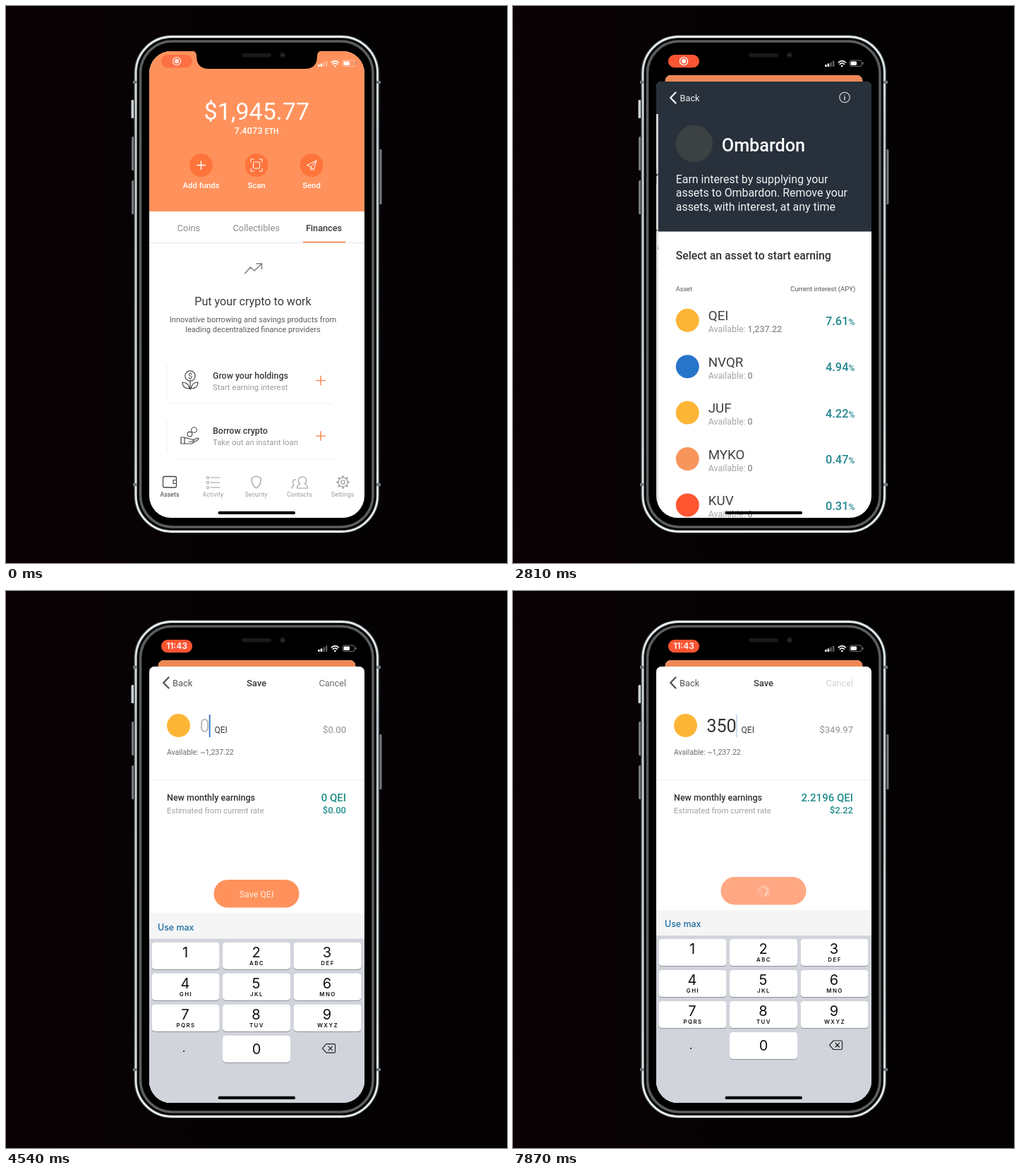
Recreate the animation shown at these times as an HTML page. Size 710 px wide and 789 px high, loop 8 s.

```html
<!DOCTYPE html>
<html lang="en">
<head>
<meta charset="utf-8">
<title>Wallet savings flow</title>
<style>
  html, body { margin: 0; width: 100%; height: 100%; overflow: hidden; background: #060203; }
  svg { display: block; width: 100%; height: 100%; font-family: Roboto, Arial, sans-serif; }
  .line { fill: none; stroke-linecap: round; stroke-linejoin: round; }
  .keys { font-family: Inter, Arial, sans-serif; }
</style>
</head>
<body>
<svg id="stage" viewBox="0 0 710 789" xmlns="http://www.w3.org/2000/svg"></svg>
<script>
const LOOP = 8000;
const ORANGE = '#ff925c', TEAL = '#1f8d8a', NAVY = '#28303b', GOLD = '#fdb536';
const COIN = 'QEI', LENDER = 'Ombardon';

// Drawing helpers
const rect = (x, y, w, h, fill, r = 0, extra = '') =>
  `<rect x="${x}" y="${y}" width="${w}" height="${h}" rx="${r}" fill="${fill}" ${extra}/>`;
const ring = (x, y, w, h, r, stroke, sw) => rect(x, y, w, h, 'none', r, `stroke="${stroke}" stroke-width="${sw}"`);
const disc = (x, y, r, fill, extra = '') => `<circle cx="${x}" cy="${y}" r="${r}" fill="${fill}" ${extra}/>`;
const path = (d, stroke, sw = 1.2, extra = '') =>
  `<path class="line" d="${d}" stroke="${stroke}" stroke-width="${sw}" ${extra}/>`;
const text = (x, y, size, fill, str, { w = 400, a = 'start', id = '', ls = 0 } = {}) =>
  `<text x="${x}" y="${y}" font-size="${size}" fill="${fill}" font-weight="${w}" text-anchor="${a}"` +
  `${id && ` id="${id}"`}${ls ? ` letter-spacing="${ls}"` : ''}>${str}</text>`;
const group = (id, body, extra = '') => `<g id="${id}" ${extra}>${body}</g>`;
const mid = { a: 'middle' }, midBold = { a: 'middle', w: 500 };
const plus = (x, y, r, color, sw) => path(`M${x - r} ${y}h${2 * r}M${x} ${y - r}v${2 * r}`, color, sw);

function defs() {
  return `<defs>
    <linearGradient id="bg"><stop stop-color="#0a0204"/><stop offset=".5" stop-color="#050203"/><stop offset="1" stop-color="#040204"/></linearGradient>
    <linearGradient id="steel" x2="0" y2="1"><stop stop-color="#e9eff0"/><stop offset=".2" stop-color="#c3cbcd"/>
      <stop offset=".8" stop-color="#d3dadb"/><stop offset="1" stop-color="#eef2f2"/></linearGradient>
    <clipPath id="screenClip"><rect x="203" y="64" width="305" height="661" rx="31"/></clipPath>
    <clipPath id="sheetClip"><rect x="203" y="107" width="305" height="660" rx="8"/></clipPath>
    <clipPath id="cardClip"><rect x="203" y="64" width="305" height="700" rx="9"/></clipPath>
  </defs>`;
}

function phone() {
  const marks = [108, 678].map(y => rect(180, y - 2, 6, 4, '#70777a') + rect(525, y - 2, 6, 4, '#70777a')).join('');
  return rect(177.5, 133, 4, 26, '#c9d0d2', 1.5) +
    rect(178, 185, 4, 48, '#75797b', 1.5) + rect(178, 247, 4, 48, '#75797b', 1.5) +
    rect(528.5, 203, 4, 78, '#75797b', 1.5) +
    rect(181, 41, 348.5, 706, '#33383b', 54) +
    ring(184, 43.5, 342.5, 701, 51, 'url(#steel)', 2.8) +
    rect(186, 46, 338.5, 696, '#000', 49) +
    ring(190.5, 50, 329.5, 688, 45, '#5b5d5e', 3.6) +
    rect(193, 53, 324.5, 682, '#000', 43) + marks;
}

function home() {
  const round = (x, label) => disc(x, 225.5, 16.5, '#ff743b') + text(x, 258, 11.3, '#fff', label, midBold);
  const card = (y, title, sub) =>
    text(293, y, 12.4, '#3a3a3a', title, { w: 500 }) + text(293, y + 16, 11.4, '#9b9b9b', sub) +
    plus(446, y + 3, 6.2, '#f5915c', 1.6);
  const tab = (x, label, color) => text(x, 695, 8.5, color, label, { a: 'middle', ls: 0.2 });
  const grey = '#9a9a9a', ink = '#444';
  const teeth = Array.from({ length: 8 }, (_, i) =>
    `<path class="line" stroke="${grey}" stroke-width="2.2" d="M477.5 667v-1" transform="rotate(${i * 45} 477.5 674.5)"/>`).join('');
  const list = [668, 675, 682].map(y => `M290 ${y}h13`).join('');
  return rect(203, 64, 305, 661, '#fff') + rect(203, 64, 305, 227, ORANGE) +
    text(355.3, 161, 34, '#fff', '$1,945.77', mid) +
    text(355, 181, 12.8, '#fff', '7.4073 <tspan font-size="10.5">ETH</tspan>', midBold) +
    round(276.5, 'Add funds') + round(355, 'Scan') + round(433, 'Send') +
    plus(276.5, 225.5, 5.8, '#fff', 1.4) +
    path('M347 221v-4h4M359 217h4v4M363 230v4h-4M351 234h-4v-4', '#fff', 1) +
    rect(350.5, 221, 9, 9, 'none', 1, 'stroke="#fff"') +
    path('M426.5 225.5l13.5-6.5-4 13.5-4-4.500zM440 219l-8 9v4.500l2.500-2.500', '#fff', 1) +
    text(259, 318.5, 12.8, '#8c8c8c', 'Coins', mid) + text(354.7, 318.5, 12.8, '#8c8c8c', 'Collectibles', mid) +
    text(450.500, 318.5, 12.7, '#3a3a3a', 'Finances', midBold) +
    rect(203, 335, 305, 1, '#e6e6e6') + rect(421, 333.5, 60, 2, '#f79762') +
    path('M338.500 379l8-9 5.500 5 10.500-10M355 365h7.500v7.500', '#7d7d7d', 1.5) +
    text(350, 424, 16.1, '#3a3a3a', 'Put your crypto to work', mid) +
    text(350, 448, 11.05, '#5c5c5c', 'Innovative borrowing and savings products from', mid) +
    text(350, 462, 11.05, '#5c5c5c', 'leading decentralized finance providers', mid) +
    rect(227.5, 508, 1, 48, '#efefef') + rect(232, 562.500, 231, 1, '#f0f0f0') +
    rect(227.5, 587, 1, 45, '#efefef') + rect(243, 641.500, 227, 1, '#f0f0f0') +
    card(527.5, 'Grow your holdings', 'Start earning interest') +
    card(606, 'Borrow crypto', 'Take out an instant loan') +
    disc(261, 524, 7.2, 'none', `stroke="${ink}" stroke-width="1.2"`) + text(261, 528, 11, ink, '$', mid) +
    path('M261 531v12M260 542c-1-6-5-9-10-9 0 6 4 9 10 9M262 542c1-6 5-9 10-9 0 6-4 9-10 9', ink) +
    disc(266.500, 600.500, 3.8, 'none', `stroke="${ink}" stroke-width="1.1"`) +
    disc(260.500, 606.500, 3.4, 'none', `stroke="${ink}" stroke-width="1.1"`) +
    path('M248 611h5v9h-5zM253 612c5-1 6 2 12 2 2 1 1 3-1 3h-5M265 615l6-3c2 0 2.500 1 1 2.500l-9 5.500h-10', ink) +
    ring(222.500, 666.500, 19, 15.5, 2.5, ink, 1.3) + path('M241.500 671.500h-4.500v5h4.500', ink) +
    path(list, grey, 1.2) + [668, 675, 682].map(y => disc(286, y, 1.7, 'none', `stroke="${grey}"`)).join('') +
    path('M354.700 666l6.500 2.500c.4 7-1.500 11.500-6.500 14.500-5-3-6.900-7.500-6.500-14.500z', grey, 1.2) +
    path('M412.500 683c0-5 3-4 4-6-3-3-3-10 3.500-10s6.500 7 3.500 10c1 2 4 1 4 6zM405 683c0-4 2.500-3 3-5-2.500-3-1.500-8 2.500-7', grey, 1.1) +
    teeth + disc(477.500, 674.500, 6.600, '#fff', `stroke="${grey}" stroke-width="1.2"`) +
    disc(477.500, 674.500, 2.700, 'none', `stroke="${grey}" stroke-width="1.1"`) +
    tab(232, 'Assets', '#333') + tab(293.500, 'Activity', grey) + tab(354.500, 'Security', grey) +
    tab(416, 'Contacts', grey) + tab(477, 'Settings', grey);
}

function growScreen() {
  const product = (y, color, name, a, b) => disc(254, y, 26.3, color) +
    text(300, y - 13, 12.5, '#2c2c2c', name, { w: 500 }) +
    text(300, y + 10, 12.6, '#a2a2a2', a) + text(300, y + 25.700, 12.6, '#a2a2a2', b);
  return rect(203, 107, 305, 618, '#fff') +
    text(228, 217, 28, TEAL, 'Grow', { w: 500 }) + text(228, 252, 28.3, '#363636', 'your holdings') +
    text(228, 326, 16, '#3a3a3a', 'Earn interest by providing liquidity') +
    text(228, 346, 16, '#3a3a3a', 'for loans and exchanges') +
    rect(203, 375, 305, 1, '#e8e8e8') +
    text(228, 414, 15.6, '#303030', 'Choose a product', { w: 500 }) +
    product(469, '#2b313a', LENDER, `Supply crypto to the ${LENDER}`, 'protocol and earn interest') +
    product(559, GOLD, 'Qei Savings', `Lock your ${COIN} with Lumdo and`, 'earn interest');
}

function fundScreen() {
  const rows = [[COIN, GOLD, '1,237.22', '7.61'], ['NVQR', '#2775ca', '0', '4.94'], ['JUF', GOLD, '0', '4.22'],
    ['MYKO', '#f8955c', '0', '0.47'], ['KUV', '#ff5530', '0', '0.31']];
  return rect(203, 107, 305, 618, '#fff') + rect(203, 107, 305, 212.500, NAVY) +
    disc(254, 195, 26.3, '#3c4143') + text(293, 205.500, 25.200, '#fff', LENDER, { w: 500 }) +
    ['Earn interest by supplying your', `assets to ${LENDER}. Remove your`, 'assets, with interest, at any time']
      .map((s, i) => text(228, 250.5 + 19.8 * i, 15.9, '#f1f2f3', s)).join('') +
    text(228, 358.500, 15.8, '#333', 'Select an asset to start earning', { w: 500 }) +
    text(228, 403.500, 9.1, '#555', 'Asset') + text(482.500, 403.500, 9.500, '#555', 'Current interest (APY)', { a: 'end' }) +
    rows.map(([name, color, amount, rate], i) => {
      const y = 445.3 + 65.400 * i;
      return disc(244.500, y, 16.500, color) + text(274, y, 18.700, '#3f3f3f', name) +
        text(274, y + 17, 12.4, '#a5a5a5', `Available: <tspan font-weight="500" fill="#8b8b8b">${amount}</tspan>`) +
        text(481.500, y + 6.700, 16.400, '#238791', `${rate}<tspan font-size="12">%</tspan>`, { a: 'end', w: 500 });
    }).join('');
}

function saveScreen() {
  const end = { a: 'end' };
  return rect(203, 107, 305, 618, '#fff') +
    group('form', disc(244.500, 190.500, 16.500, GOLD) +
      text(274.500, 200, 25, '#bdbdbd', '0', { id: 'amount' }) +
      rect(287.500, 175, 1.8, 32, '#2b73c0', 0, 'id="caret"') +
      text(295.500, 200.500, 12, '#3a3a3a', COIN, { id: 'unit' }) +
      text(482, 201, 13.1, '#8f8f8f', '', { ...end, id: 'value' }) +
      text(228, 231.500, 10.500, '#6a6a6a', 'Available: ~1,237.22') +
      rect(203, 267, 305, 1, '#efefef') +
      text(228, 297, 12.500, '#303030', 'New monthly earnings', { w: 500 }) +
      text(228, 314.500, 11.250, '#a0a0a0', 'Estimated from current rate') +
      text(482, 297.500, 15, TEAL, '', { ...end, w: 500, id: 'earn' }) +
      text(482, 315.300, 13, TEAL, '', { ...end, w: 500, id: 'earnValue' })) +
    group('button', rect(294.500, 405, 121, 39.500, ORANGE, 19.700, 'id="pillButton"') +
      text(355, 429.500, 12.4, '#ffeadf', 'Save ' + COIN, { ...mid, id: 'buttonText' }) +
      group('spinner', Array.from({ length: 12 }, (_, i) =>
        path('M355 420.500v-3.500', '#fff', 1.2, `opacity="${1 - i * .075}" transform="rotate(${-30 * i} 355 425)"`)).join('')));
}

function keyboard() {
  const letters = ['', 'ABC', 'DEF', 'GHI', 'JKL', 'MNO', 'PQRS', 'TUV', 'WXYZ'];
  const key = (n, x, y) => rect(x, y + 1, 96, 38, '#8d9097', 4.5) + rect(x, y, 96, 38, '#fff', 4.5, `id="key${n}"`);
  return rect(203, 452, 305, 36.500, '#f5f5f6') + rect(203, 488, 305, 260, '#d1d4db') +
    text(215, 476, 12.4, '#1d6c9f', 'Use max', { w: 500 }) +
    letters.map((s, i) => {
      const x = 206.500 + i % 3 * 100.500, y = 493 + 44 * Math.floor(i / 3);
      return key(i + 1, x, y) + text(x + 47.500, y + 21, 20, '#111', i + 1, mid) +
        text(x + 48.500, y + 32.300, 7.8, '#111', s, { a: 'middle', w: 600, ls: 1.5 });
    }).join('') +
    key(0, 307, 625) + text(355, 651, 20, '#111', '0', mid) + text(252, 648.500, 16, '#111', '.', mid) +
    path('M448.500 643.300l5.500-6.300h11q1.500 0 1.500 1.500v9.500q0 1.500-1.500 1.500h-11zM457 640.500l5.500 5.500M462.500 640.500l-5.500 5.500', '#222', 1.2);
}

function navBars() {
  const back = (id, color) => path('M230.500 122.500l-7.300 7.500 7.300 7.500', color, 2.400) + text(236, 134.500, 12.8, color, 'Back', { id });
  return group('navGrow', text(482, 134.500, 12.600, '#555', 'Done', { a: 'end' })) +
    group('navFund', rect(203, 107, 305, 46, NAVY) + back('backFund', '#f2f2f2') +
      disc(470, 129.500, 7.200, 'none', 'stroke="#e6e6e6" stroke-width="1.1"') +
      path('M470 128.500v4.500M470 126v.1', '#e6e6e6', 1.3)) +
    group('navSave', rect(203, 107, 305, 46, '#fff') + back('backSave', '#555') +
      text(355, 134.500, 13, '#3a3a3a', 'Save', midBold) +
      text(482, 134.500, 12.700, '#6c6c6c', 'Cancel', { a: 'end', id: 'cancel' }));
}

function status() {
  const bars = [3, 4.5, 6.500, 8.500].map((h, i) => rect(442 + 3.600 * i, 86 - h, 2.600, h, '#fff', .6, `opacity="${i < 2 ? 1 : .35}"`)).join('');
  return group('pill', rect(220, 69, 44, 18.300, '#fb5533', 9.100)) +
    group('record', disc(242, 78.200, 5.600, 'none', 'stroke="#fff" stroke-width="1.3"') + disc(242, 78.200, 3.100, '#fff')) +
    text(242, 82.400, 12, '#fff', '11:43', { a: 'middle', w: 600, id: 'clock' }).replace('<text', '<text class="keys"') + bars +
    path('M461.300 80a7 7 0 0 1 10 0M463.300 82.300a4.300 4.300 0 0 1 6 0', '#fff', 1.7) + disc(466.300, 85, 1.300, '#fff') +
    ring(477, 77, 17, 8.600, 2.600, 'rgba(255,255,255,.45)', 1) + rect(478.500, 78.500, 8.500, 5.600, '#fff', 1.400) +
    rect(495, 79.800, 1.400, 3, '#888', .6);
}

document.getElementById('stage').innerHTML = defs() + rect(0, 0, 710, 789, 'url(#bg)') + phone() +
  group('screen', rect(203, 64, 305, 661, '#000') +
    group('home', home() + rect(203, 64, 305, 700, '#000', 0, 'id="homeDim"'), 'clip-path="url(#cardClip)"') +
    group('sheet',
      group('grow', growScreen()) + rect(203, 107, 305, 618, '#000', 0, 'id="growDim"') +
      group('fund', fundScreen()) + rect(203, 107, 305, 618, '#000', 0, 'id="fundDim"') +
      group('save', saveScreen()) + navBars() + group('keyboard', keyboard(), 'class="keys"'),
      'clip-path="url(#sheetClip)"') +
    '<path d="M263 63q7 1 7 8q0 18 18 18h135q18 0 18-18q0-7 7-8z"/>' + status() +
    rect(300.500, 715.800, 109.500, 4.200, '#000', 2.100), 'clip-path="url(#screenClip)"') +
  rect(334, 67, 42, 5.500, '#191919', 2.700) + disc(392, 69.500, 4, '#15171b') + disc(392, 69.500, 1.600, '#30343d');

// Motion
const el = new Proxy({}, { get: (cache, id) => cache[id] || (cache[id] = document.getElementById(id)) });
const set = (id, attrs) => { for (const k in attrs) el[id].setAttribute(k, attrs[k]); };
const move = (id, x, y) => set(id, { transform: `translate(${x} ${y})` });
const show = (id, opacity) => set(id, { opacity });
const clamp = v => Math.max(0, Math.min(1, v));
const spring = (t, start) => {
  const k = Math.max(0, t - start) * .0177;
  return 1 - (1 + k) * Math.exp(-k);
};
const PRESSES = [[5700, 3], [6000, 5], [6300, 0]];

function drawForm(t) {
  const typed = PRESSES.filter(([at]) => t >= at);
  const digits = typed.map(([, n]) => n).join('') || '0';
  const amount = +digits, monthly = amount * .0761 / 12;
  const last = typed.length ? typed[typed.length - 1][0] : 4300;
  const blink = (t - last) % 1000;
  const end = 274.500 + 14.040 * digits.length;
  el.amount.textContent = digits;
  set('amount', { fill: amount ? '#333' : '#bdbdbd' });
  set('caret', { x: end - .8, opacity: t < 4300 ? 0 : blink < 600 ? clamp((600 - blink) / 100) : clamp((blink - 900) / 100) });
  set('unit', { x: end + 7 });
  el.value.textContent = '$' + (amount * .99991).toFixed(2);
  el.earn.textContent = (amount ? monthly.toFixed(4) : '0') + ' ' + COIN;
  el.earnValue.textContent = '$' + monthly.toFixed(2);
  for (const [at, n] of PRESSES) set('key' + n, { fill: t >= at && t < at + 130 ? '#b4b9c3' : '#fff' });

  const busy = t >= 7400;
  set('pillButton', { fill: busy ? '#ffa883' : ORANGE });
  show('buttonText', busy ? 0 : 1);
  show('spinner', busy ? .9 : 0);
  set('spinner', { transform: `rotate(${Math.floor((t - 7400) / 83.3) * 30} 355 425)` });
  set('cancel', { fill: busy ? '#d2d2d2' : '#6c6c6c' });
}

function draw(t) {
  const rise = 1 - (1 - clamp((t - 1040) / 580)) ** 2;
  const push = spring(t, 2430), push2 = spring(t, 3740), keys = spring(t, 4200);
  const scale = 1 - .082 * rise;
  set('home', { transform: `translate(355.5 ${64 + 34 * rise}) scale(${scale}) translate(-355.5 -64)` });
  show('homeDim', .07 * rise);
  move('sheet', 0, 618 * (1 - rise));

  move('grow', -91.500 * push, 0);
  show('growDim', .13 * push);
  move('fund', 305 * (1 - push) - 91.500 * push2, 0);
  show('fundDim', .13 * push2);
  move('save', 305 * (1 - push2), 0);

  show('navGrow', clamp(1 - push * 2));
  show('navFund', clamp(push * 1.8));
  set('backFund', { x: 236 + 54 * (1 - push), opacity: push });
  show('navSave', clamp(push2 * 1.8));
  set('backSave', { x: 236 + 54 * (1 - push2), opacity: push2 });

  move('form', 0, 4 * (1 - keys));
  move('button', 0, 241 * (1 - keys));
  move('keyboard', 0, 275 * (1 - keys));
  drawForm(t);

  const clock = clamp((t - 3010) / 200);
  show('pill', .55 + .45 * rise);
  show('record', (.8 + .2 * rise) * (1 - clock));
  show('clock', clock);
}

const begin = performance.now();
function tick() {
  draw((performance.now() - begin) % LOOP);
  requestAnimationFrame(tick);
}
tick();
</script>
</body>
</html>
```
